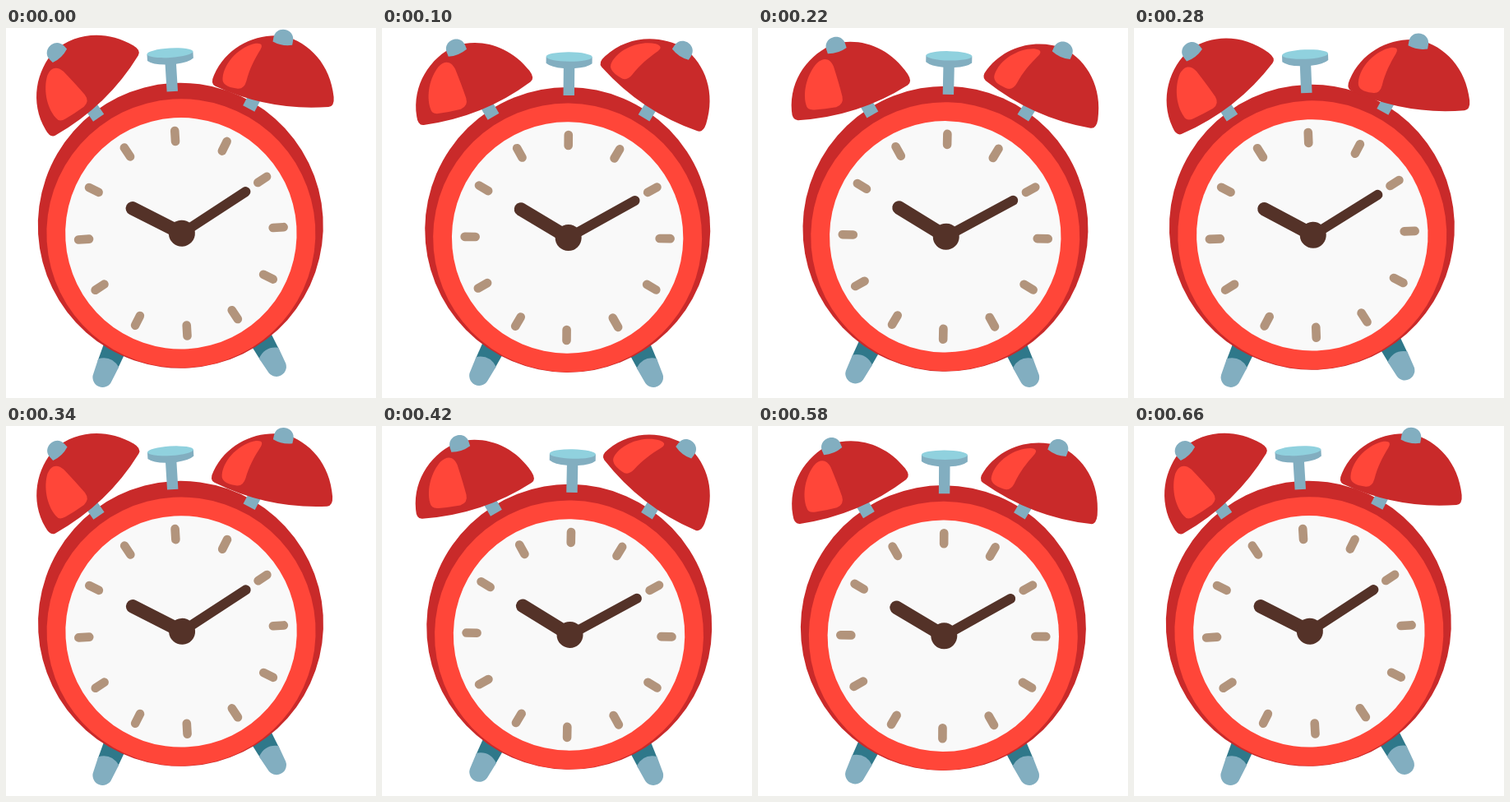
Write an HTML page that moves like this. It is 450 by 450 pixels and loops after 0.68 s.

```html
<!DOCTYPE html>
<html lang="en">
<head>
<meta charset="utf-8">
<title>Alarm clock</title>
<style>
  html, body { margin: 0; width: 100%; height: 100%; overflow: hidden; background: #fff; }
  svg { display: block; width: 100%; height: 100%; }
  .dark { fill: #c92a2a; }
  .red { fill: #ff4639; }
  .steel { fill: #82aec0; }
  .teal { fill: #2f788a; }
  .hand { stroke: #543228; stroke-linecap: round; }
</style>
</head>
<body>
<svg viewBox="0 0 450 450">
  <defs>
    <g id="foot" transform="translate(-105.5 168) rotate(26)">
      <path class="teal" d="M-15-55H15L13-15H-13Z"/>
      <path class="steel" d="M-13.5-18Q0-28 13.5-18L12 1A12 12 0 0 1-12 1Z"/>
    </g>
    <path id="neck" class="steel" d="M-8 0V-30H8V0Z" transform="translate(-91.5 -146.5) rotate(-31)"/>
    <path id="dome" class="dark" d="M-71 73Q-78 71-75 60C-66 22-33 0 0-2C32 0 62 22 73 60Q76 71 69 73Q0 91-71 73Z"/>
    <path id="knob" class="steel" d="M-12 2C-12-14 12-14 12 2V7Q0 11-12 7Z"/>
  </defs>
  <g id="clock">
    <g transform="translate(224 256)">
      <use href="#foot"/>
      <use href="#foot" transform="scale(-1 1)"/>
      <circle class="dark" cy="-9.6" r="173.5"/>
      <circle class="red" r="163.5"/>
      <circle fill="#f9f9f9" r="140.7"/>
      <g id="ticks" stroke="#b2947c" stroke-width="10.6" stroke-linecap="round"></g>
      <path class="hand" d="M1 0L-57-34" stroke-width="16.5"/>
      <path class="hand" d="M1 0L81.5-45.8" stroke-width="12"/>
      <circle cx="1" r="16" fill="#543228"/>
      <path class="steel" d="M-28-220V-212Q-22-207-6.7-206V-173H6.7V-206Q22-207 28-212V-220Z"/>
      <ellipse cy="-220" rx="28" ry="5.7" fill="#90d1de"/>
      <use href="#neck"/>
      <use href="#neck" transform="scale(-1 1)"/>
      <g id="leftBell">
        <use href="#dome"/>
        <path class="red" d="M-56 58C-55 40-42 22-28 14C-17 9-11 14-10 24Q-10 45-11 62Q-12 72-22 72Q-36 70-48 67Q-57 65-56 58Z"/>
        <use href="#knob"/>
      </g>
      <g id="rightBell">
        <use href="#dome"/>
        <path class="red" d="M-64 62C-66 42-50 20-32 13Q-22 10-25 19C-30 32-34 45-35 60Q-36 71-45 71Q-63 72-64 62Z"/>
        <use href="#knob"/>
      </g>
    </g>
  </g>
</svg>
<script>
const LOOP = 680, STEP = 20, SWING = 330;
const { sin, cos, PI } = Math;
const $ = id => document.getElementById(id);
const place = (id, transform) => $(id).setAttribute('transform', transform);

for (let a = 0; a < 360; a += 30)
  $('ticks').innerHTML += `<path d="M0-112V-125" transform="rotate(${a})"/>`;

function draw(now) {
  const t = Math.floor(now % LOOP / STEP) * STEP;
  const phase = 2 * PI * t / SWING;
  // Makes the first swing a little narrower than the second
  const drift = sin(phase / 2) * sin(phase) ** 2;
  const tilt = -3.5 * cos(phase) - 0.85 * drift;
  // The left bell follows the tilt, the right one runs ahead of it
  const left = -25.2 + 5 * tilt + 0.18 * tilt ** 2;
  const right = 25.5 - 13.5 * cos(phase + 0.53) - 3.5 * drift;

  // The clock tips over whichever foot is on the ground
  place('clock', `rotate(${tilt} ${tilt < 0 ? 117 : 331} 435)`);
  place('leftBell', `translate(-138.5 -230) rotate(${left})`);
  place('rightBell', `translate(139 -230) rotate(${right})`);
}

const start = performance.now();
function tick() {
  draw(performance.now() - start);
  requestAnimationFrame(tick);
}
tick();
</script>
</body>
</html>
```
